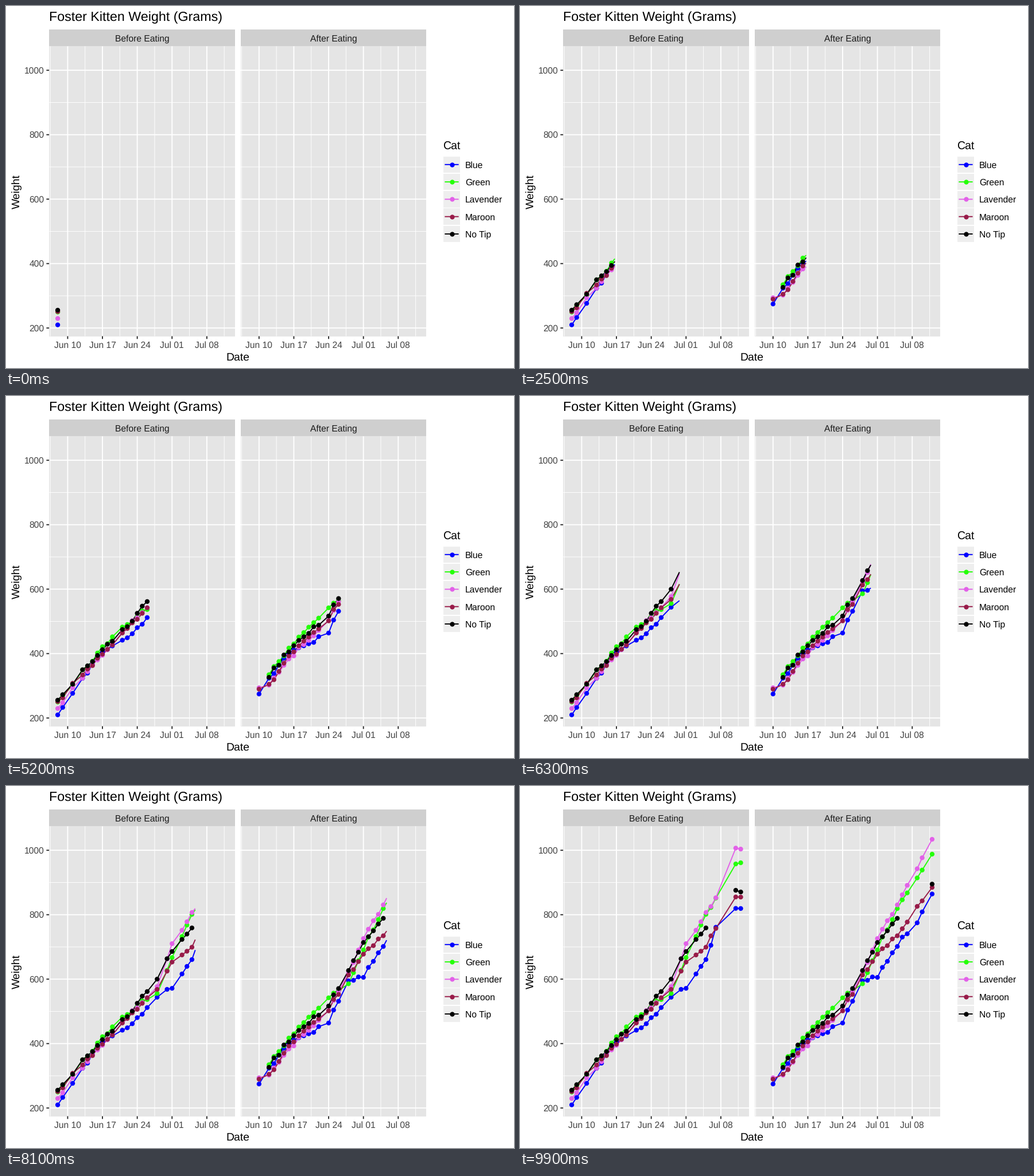
Write a matplotlib script that moves like this. It is 885 px wide and 632 px high and loops after 10000 ms.

```python
import numpy as np
import matplotlib.pyplot as plt
from matplotlib.animation import FuncAnimation
from matplotlib.patches import Rectangle

W, H, DPI = 885, 632, 64
PT = 72 / DPI  # points per pixel
FRAMES, SPAN = 100, 34  # SPAN: days from Jun 8 to Jul 12
NA = np.nan

plt.rcParams.update({"font.family": "Liberation Sans", "text.hinting": "none"})

CATS = {
    "Blue": "#0000ff",
    "Green": "#24ff08",
    "Lavender": "#e261e8",
    "Maroon": "#981b49",
    "No Tip": "#000000",
}

# Growth curves: grams at a few days since Jun 8; NA means not weighed.
PANELS = [
    dict(title="Before Eating",
         days_off={2, 4, 12, 19, 21, 24, 30, 31, 32},
         key_days=[0, 8, 15, 20, 23, 27, 29, 33],
         growth=[[215, 390, 459, 544, 574, 660, 760, 820],
                 [250, 402, 508, 560, 667, 798, 852, 961],
                 [233, 378, 497, 575, 706, 801, 851, 1002],
                 [253, 380, 496, 572, 651, 701, 762, 856],
                 [255, 397, 503, 601, 689, 756, NA, 874]]),
    dict(title="After Eating",
         days_off={0, 1, 3, 15, 19, 30, 33},
         key_days=[2, 4, 8, 16, 20, 23, 27, 31, 34],
         growth=[[277, 323, 402, 464, 594, 607, 706, 776, 867],
                 [NA, 338, 419, 542, 588, 693, 820, 917, 989],
                 [291, 305, 382, 503, 620, 729, 831, 946, 1033],
                 [291, 299, 392, 505, 606, 678, 733, 825, 879],
                 [NA, 331, 411, 521, 626, 713, 786, NA, 898]]),
]
WOBBLE = 3  # day-to-day spread in grams

LEFT, TOP, PANEL_W, PANEL_H, STEP = 75.2, 70.3, 323.8, 506.2, 333.4
STRIP_TOP = 41
BOTTOM = TOP + PANEL_H
LINE, DOT = 1.9, (8.3 * PT) ** 2

fig = plt.figure(figsize=(W / DPI, H / DPI), dpi=DPI, facecolor="white")
ax = fig.add_axes([0, 0, 1, 1])
ax.set(xlim=(0, W), ylim=(H, 0))
ax.axis("off")


def day_x(day, panel):
    return 90.1 + 8.66 * np.asarray(day) + panel * STEP


def weight_y(grams):
    return 562.2 - 0.5625 * (np.asarray(grams) - 200)


def rect(x, y, w, h, color):
    ax.add_patch(Rectangle((x, y), w, h, fc=color, lw=0, zorder=0))


def line(x, y, color, width=LINE, z=1):
    return ax.plot(x, y, color=color, lw=width * PT, zorder=z, snap=False,
                   solid_capstyle="butt", solid_joinstyle="round")[0]


def text(x, y, label, size=15.6, color="black", ha="left", **kw):
    ax.text(x, y, label, fontsize=size * PT, color=color, ha=ha,
            va="baseline", **kw)


def draw_panel(panel, title):
    x0 = LEFT + panel * STEP
    x1 = x0 + PANEL_W
    rect(x0, STRIP_TOP, PANEL_W, TOP - STRIP_TOP, "#cfcfcf")
    rect(x0, TOP, PANEL_W, PANEL_H, "#e5e5e5")
    text((x0 + x1) / 2, 61.6, title, color="#1a1a1a", ha="center")
    for grams in range(300, 1000, 200):
        line([x0, x1], [weight_y(grams)] * 2, "white", 0.95)
    for k in range(6):
        line([day_x(7 * k - 1.5, panel)] * 2, [TOP, BOTTOM], "white", 0.95)
    for grams in range(200, 1001, 200):
        line([x0, x1], [weight_y(grams)] * 2, "white")
    for k, label in enumerate(["Jun 10", "Jun 17", "Jun 24", "Jul 01", "Jul 08"]):
        x = day_x(7 * k + 2, panel)
        line([x, x], [TOP, BOTTOM], "white")
        line([x, x], [BOTTOM, BOTTOM + 4.8], "#2b2b2b")
        text(x, 596.8, label, color="#424242", ha="center")


def draw_legend():
    text(760.8, 250.4, "Cat", 19.5)
    for k, (name, color) in enumerate(CATS.items()):
        y = 276.8 + 30.3 * k
        rect(762.2, y - 14.3, 28.6, 28.6, "#eeeeee")
        line([764.4, 788.6], [y, y], color)
        ax.scatter([776.5], [y], s=DOT, c=color, lw=0, zorder=5)
        text(800.2, y + 5.7, name)


def weighings(panel):
    """Yield color, reveal step, x and y of each cat's weighings."""
    spec = PANELS[panel]
    rng = np.random.default_rng(8 + panel)
    days = np.array([d for d in range(SPAN + 1) if d not in spec["days_off"]])
    step = np.round(days * (FRAMES - 1) / SPAN)
    for color, curve in zip(CATS.values(), spec["growth"]):
        grams = np.interp(days, spec["key_days"], curve)
        grams += rng.normal(0, WOBBLE, len(days))
        yield color, step, day_x(days, panel), weight_y(grams)


text(74.8, 26.5, "Foster Kitten Weight (Grams)", 23.3)
for panel, spec in enumerate(PANELS):
    draw_panel(panel, spec["title"])
for grams in range(200, 1001, 200):
    y = float(weight_y(grams))
    line([LEFT - 4.8, LEFT], [y, y], "#2b2b2b")
    text(66.4, y + 5.6, str(grams), color="#424242", ha="right")
text(403.7, 618.5, "Date", 19.4, ha="center")
text(23.6, 323.6, "Weight", 19.4, ha="center", rotation=90,
     rotation_mode="anchor")
draw_legend()

tracks, dots = [], []
for panel in range(len(PANELS)):
    for color, step, x, y in weighings(panel):
        tracks.append((line([], [], color, z=3), step, x, y))
        dots += [(s, px, py, color) for s, px, py in zip(step, x, y)
                 if np.isfinite(py)]

dot_step, dot_x, dot_y, dot_color = zip(*dots)
dot_step = np.array(dot_step)
points = ax.scatter(dot_x, dot_y, s=DOT, c=dot_color, lw=0, zorder=4)


def update(i):
    for artist, step, x, y in tracks:
        n = int(np.sum(step <= i))
        if n == 0:
            artist.set_data([], [])
            continue
        head = np.interp(i, step, x), np.interp(i, step, y)
        artist.set_data(np.append(x[:n], head[0]), np.append(y[:n], head[1]))
    points.set_sizes(np.where(dot_step <= i, DOT, 0))
    return [t[0] for t in tracks] + [points]


anim = FuncAnimation(fig, update, frames=FRAMES, interval=100, repeat=True,
                     repeat_delay=0, blit=False)
plt.show()
```
